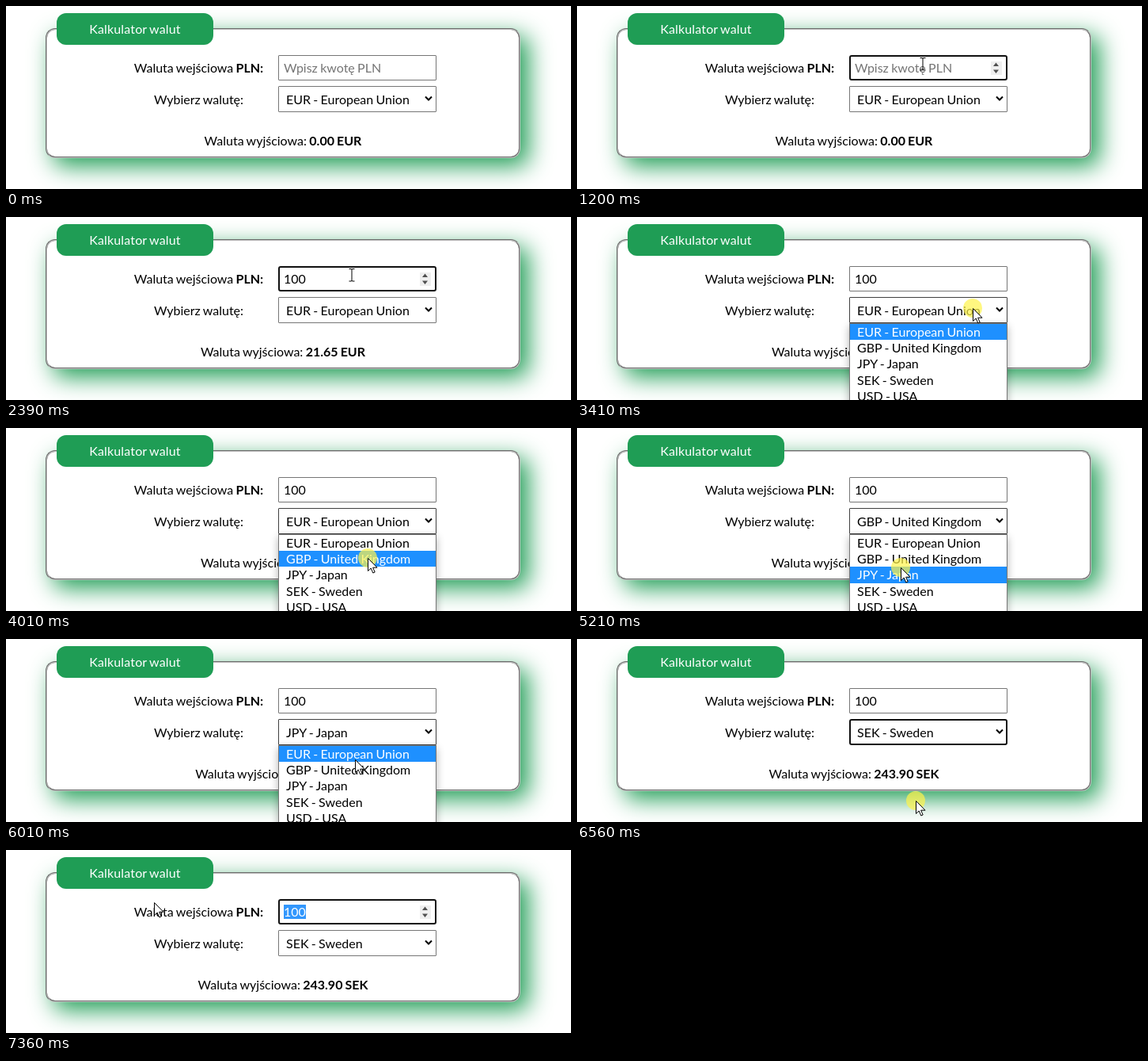
Recreate the animation shown at these times as an HTML page. Size 714 px wide and 231 px high, loop 8000 ms.

```html
<!DOCTYPE html>
<html lang="pl">
<head>
<meta charset="utf-8">
<title>Kalkulator walut</title>
<style>
  html, body { margin: 0; width: 100%; height: 100%; overflow: hidden; background: #fff; }
  body { position: relative; font: 16px/20px Lato, sans-serif; word-spacing: -.8px; color: #000; white-space: pre; }
  body > * { position: absolute; box-sizing: border-box; }
  #card { left: 50px; top: 28px; width: 600px; height: 164px; border: 2px groove #c0c0c0;
    border-radius: 12px; box-shadow: 10px 10px 30px #1f9d55; background: #fff; }
  #legend { left: 64px; top: 9px; width: 198px; height: 40px; border-radius: 12px;
    background: #1f9d55; color: #fff; line-height: 40px; text-align: center; letter-spacing: .15px; }
  .label { left: 143.5px; width: 200px; text-align: center; }
  #output { left: 50px; width: 600px; top: 160px; text-align: center; }
  .field { left: 344px; width: 200px; border: 1px solid #767676; border-radius: 1px; background: #fff; }
  .field.open { border-color: #404040; }
  .field.focus { border: 2px solid #101010; border-radius: 3px; }
  #input { top: 62px; height: 32px; }
  #select { top: 101px; height: 33px; }
  #amount { left: 351px; top: 68px; }
  #choice { left: 354px; top: 108px; }
  #mark { top: 69px; height: 18px; overflow: hidden; background: #3297fd; color: #fff; line-height: 18px; }
  #caret { top: 69px; width: 1px; height: 18px; background: #000; }
  #list { left: 344px; top: 134px; width: 200px; height: 110px; border: 1px solid #767676;
    background: #fff; box-shadow: 0 4px 10px rgba(0, 0, 0, .3); }
  #list div { height: 20.2px; padding-left: 9px; }
  #list .hot { background: #1e90ff; color: #fff; }
  #art { left: 0; top: 0; }
</style>
</head>
<body>
<div id="card"></div>
<div id="legend">Kalkulator walut</div>
<div class="label" style="top:68px">Waluta wejściowa <b>PLN:</b></div>
<div class="label" style="top:108px">Wybierz walutę:</div>
<div id="output">Waluta wyjściowa: <b id="result"></b></div>
<div id="input" class="field"></div>
<div id="select" class="field"></div>
<div id="amount"></div>
<div id="mark">100</div>
<div id="caret"></div>
<div id="choice"></div>
<div id="list"></div>
<svg id="art" width="714" height="231">
  <path d="M530 114.500l4 4 4-4" fill="none" stroke="#000" stroke-width="2"/>
  <g id="spinner">
    <path d="M523 70h14v17h-14z" fill="#efefef"/>
    <path d="M526 76l3.500-4.500L533 76zM526 80.500h7L529.500 85z" fill="#505050"/>
  </g>
  <g id="pointer">
    <circle id="halo" r="12" fill="#fff34a"/>
    <path id="arrow" d="M.5.5V16.500L4.200 13l2.600 6 2.400-1-2.600-5.800H12z" fill="#fff" stroke="#000"/>
    <path id="beam" d="M-3.500-7.500h2.500q1 0 1 1 0-1 1-1h2.500M0-6.500V7M-3.500 8H-1q1 0 1-1 0 1 1 1h2.500" fill="none" stroke="#000"/>
  </g>
</svg>
<script>
const LOOP = 8000, BLINK = 530, PRESS = 130, GLIDE = 340;
const TEXT_X = 351, LIST_Y = 135, ROW = 20.2;
const $ = id => document.getElementById(id);
const currencies = [
  ['EUR - European Union', 4.62], ['GBP - United Kingdom', 5.25],
  ['JPY - Japan', 0.032], ['SEK - Sweden', 0.41], ['USD - USA', 4.25]
];

// The user types an amount, picks the next currency three times, then selects the amount
const focusAt = 670, typeAt = 1530, keyGap = 165, refocusAt = 6890;
const picks = [[3270, 4010], [4670, 5210], [5610, 6420]]; // click on the box, click on a row
const clicks = [focusAt, ...picks.flat(), refocusAt];
// Pointer stops: arrival time and place
const stops = [[0, 630, 250], [530, 437, 73], [2920, 556, 120], [3270, 500, 115],
  [3810, 457, 164], [4540, 453, 108], [4940, 409, 176], [5470, 439, 112],
  [6010, 441, 152], [6350, 428, 204], [6880, 419, 66], [7360, 187, 66]];

const rows = currencies.map(([name]) => {
  const row = $('list').appendChild(document.createElement('div'));
  row.textContent = name;
  return row;
});
const show = (id, on) => { $(id).style.display = on ? '' : 'none'; };
const textWidth = text => {
  $('amount').textContent = text;
  return $('amount').getBoundingClientRect().width;
};

// Each glide starts after the previous stop and after any click made there
function pointerAt(t) {
  const next = stops.findIndex(([arrive]) => arrive > t);
  if (next < 0) return stops[stops.length - 1].slice(1);
  const [left, x0, y0] = stops[next - 1], [arrive, x1, y1] = stops[next];
  const released = Math.max(...clicks.filter(c => c < arrive).map(c => c + PRESS));
  const start = Math.max(left, arrive - GLIDE, released);
  const u = Math.max(0, (t - start) / (arrive - start)), e = u * u * (3 - 2 * u);
  return [x0 + (x1 - x0) * e, y0 + (y1 - y0) * e];
}

function render(t) {
  const [x, y] = pointerAt(t);
  const typed = Math.max(0, Math.min(3, Math.floor((t - typeAt) / keyGap) + 1));
  const amount = '100'.slice(0, typed);
  const current = picks.filter(([, pick]) => t >= pick + PRESS).length;
  const open = picks.some(([press, pick]) => t >= press + PRESS && t < pick + PRESS);
  const [name, rate] = currencies[current];
  const typing = t >= focusAt && t < picks[0][0] || t >= refocusAt;
  const dragging = t >= refocusAt + PRESS && t < 7360;
  const overInput = x > 344 && x < 544 && y > 62 && y < 94;

  const end = textWidth(amount);
  $('amount').textContent = amount || 'Wpisz kwotę PLN';
  $('amount').style.color = amount ? '#000' : '#757575';
  $('choice').textContent = name;
  $('result').textContent = (amount / rate).toFixed(2) + ' ' + name.slice(0, 3);
  $('input').classList.toggle('focus', typing);
  $('select').classList.toggle('focus', current > 0 && !open && !typing);
  $('select').classList.toggle('open', open);
  show('spinner', typing || overInput);

  const from = t > refocusAt + PRESS ? Math.max(0, Math.min(end, x - TEXT_X)) : end;
  show('mark', from < end);
  $('mark').style.left = TEXT_X + from + 'px';
  $('mark').style.width = end - from + 'px';
  $('mark').style.textIndent = -from + 'px';

  const lastKey = typed ? typeAt + keyGap * (typed - 1) : focusAt;
  const idle = t - (t < refocusAt ? lastKey : refocusAt);
  show('caret', typing && from === end && Math.floor(idle / BLINK) % 2 === 0);
  $('caret').style.left = Math.floor(TEXT_X + end) + 'px';

  show('list', open);
  const hover = y >= LIST_Y ? Math.floor((y - LIST_Y) / ROW) : current;
  rows.forEach((row, i) => row.classList.toggle('hot', i === hover));

  show('halo', clicks.some(c => t >= c && t < c + PRESS + 40));
  $('halo').setAttribute('opacity', 0.7);
  const beam = overInput || dragging;
  show('beam', beam);
  show('arrow', !beam);
  $('pointer').setAttribute('transform', `translate(${Math.round(x)} ${Math.round(y)})`);
}

function tick() {
  render(performance.now() % LOOP);
  requestAnimationFrame(tick);
}
tick();
</script>
</body>
</html>
```
